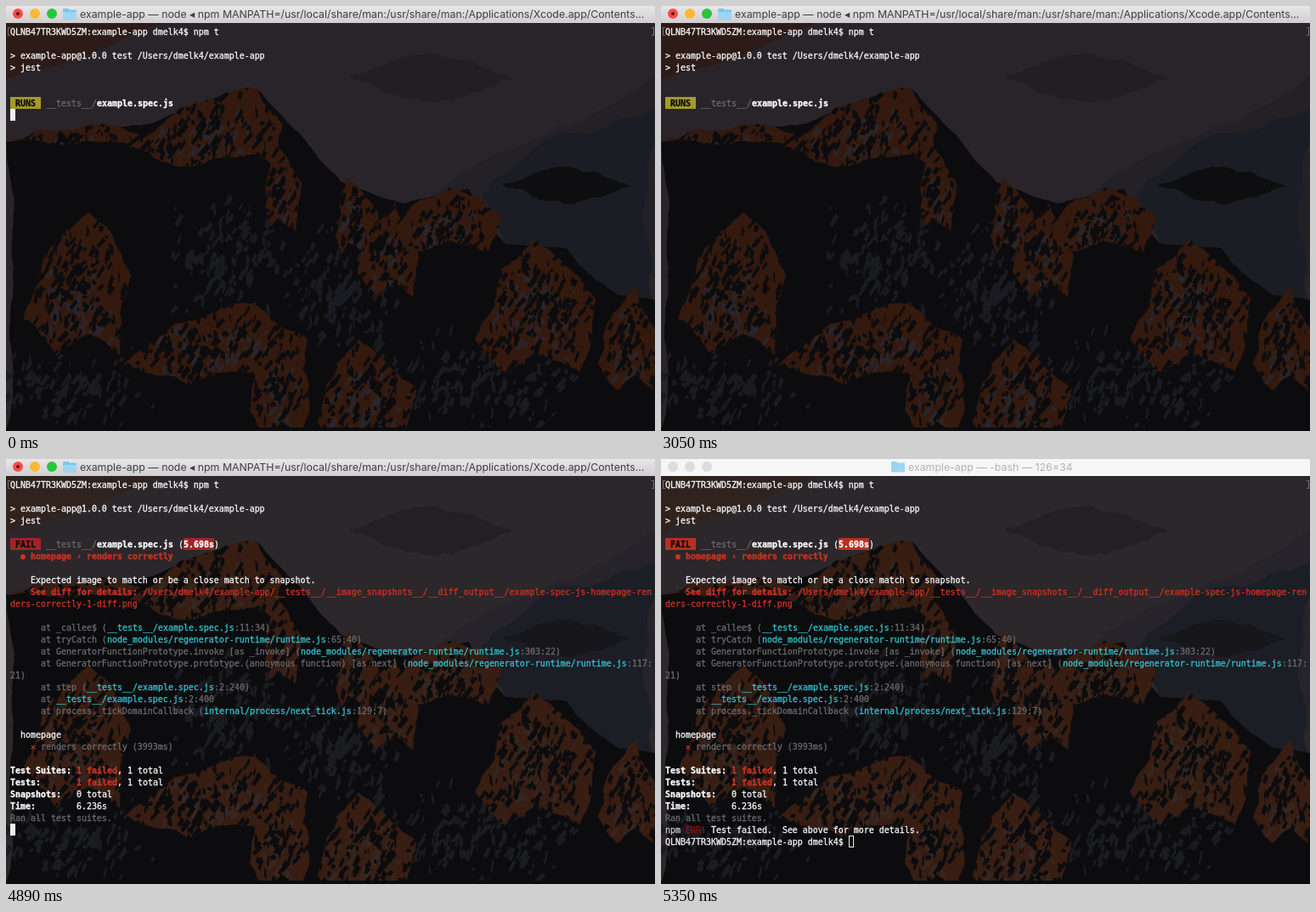
Write an HTML page with a canvas that moves like this. It is 764 px wide and 500 px high and loops after 5.45 s.

```html
<!DOCTYPE html>
<html lang="en">
<head>
<meta charset="utf-8">
<title>Terminal test run</title>
<style>
html, body { margin: 0; width: 100%; height: 100%; overflow: hidden; background: #0c0c0e; }
canvas { display: block; }
</style>
</head>
<body>
<canvas id="stage" width="764" height="500"></canvas>
<script>
const W = 764, H = 500, LOOP = 5450;
const CELL = 6, ROW = 14, LEFT = 5, TOP = 23, BAR = 20;
const MONO = '9.967px "DejaVu Sans Mono", monospace';
const TITLE_FONT = '12.35px Inter, sans-serif';
const ctx = document.getElementById('stage').getContext('2d');

const HOST = 'QLNB47TR3KWD5ZM', USER = 'dmelk4';
const PROMPT = `${HOST}:example-app ${USER}$ `;
const SPEC = '__tests__/example.spec.js';
const RUNTIME = 'node_modules/regenerator-runtime/runtime.js';

const STYLES = {
  white: { color: '#f8f8f8' },
  bold: { color: '#ffffff', bold: true },
  soft: { color: '#c7c7c7' },
  gray: { color: '#6b696b' },
  red: { color: '#c93522' },
  redBold: { color: '#c93522', bold: true },
  error: { color: '#940f10' },
  cyan: { color: '#34c2cd' },
  runs: { color: '#0c0c0c', bold: true, back: '#a59a2b' },
  fail: { color: '#0c0c0c', bold: true, back: '#a22428' },
  slow: { color: '#ffffff', bold: true, back: '#a22428' }
};

const trace = (call, file, place) =>
  [['gray', '      at ' + call], ['cyan', file], ['gray', place]];
const total = (label, rest, failed = '') =>
  [['bold', label.padEnd(13)], ['redBold', failed], ['white', rest]];

const command = {
  0: [['white', PROMPT + 'npm t']],
  2: [['white', `> example-app@1.0.0 test /Users/${USER}/example-app`]],
  3: [['white', '> jest']]
};
const running = {
  6: [['runs', ' RUNS '], ['gray', ' __tests__/'], ['bold', 'example.spec.js']]
};
const report = {
  5: [['fail', ' FAIL '], ['gray', ' __tests__/'], ['bold', 'example.spec.js'],
      ['white', ' ('], ['slow', '5.698s'], ['white', ')']],
  6: [['redBold', '  ●'], ['redBold', ' homepage ›'], ['redBold', ' renders correctly']],
  8: [['white', '    Expected image to match or be a close match to snapshot.']],
  9: [['redBold', '    See diff for details: '],
      ['red', `/Users/${USER}/example-app/__tests__/__image_snapshots__/__diff_output__/example-spec-js-homepage-ren`]],
  10: [['red', 'ders-correctly-1-diff.png']],
  12: trace('_callee$ (', SPEC, ':11:34)'),
  13: trace('tryCatch (', RUNTIME, ':65:40)'),
  14: trace('GeneratorFunctionPrototype.invoke [as _invoke] (', RUNTIME, ':303:22)'),
  15: trace('GeneratorFunctionPrototype.prototype.(anonymous function) [as next] (', RUNTIME, ':117:'),
  16: [['gray', '21)']],
  17: trace('step (', SPEC, ':2:240)'),
  18: trace('', SPEC, ':2:400'),
  19: trace('process._tickDomainCallback (', 'internal/process/next_tick.js', ':129:7)'),
  21: [['white', '  homepage']],
  22: [['red', '    ✕'], ['gray', ' renders correctly (3993ms)']],
  24: total('Test Suites:', ', 1 total', '1 failed'),
  25: total('Tests:', ', 1 total', '1 failed'),
  26: total('Snapshots:', '0 total'),
  27: total('Time:', '6.236s'),
  28: [['gray', 'Ran all test suites.']]
};
const finished = {
  29: [['soft', 'npm '], ['error', 'ERR!'], ['white', ' Test failed.  See above for more details.']],
  30: [['white', PROMPT]]
};

const runningScene = {
  sky: '#292429', glow: '#2c1b17', cloud: '#221e22', storm: '#0e0e11', haze: '#232026',
  blue: '#1b1d24', rock: '#0c0c0e', lit: '#34190e', snow: '#1a1b21', frost: '#2b2428'
};
const reportScene = {
  sky: '#2b272a', glow: '#30221d', cloud: '#231f22', storm: '#17171b', haze: '#26232a',
  blue: '#1c1e25', rock: '#0c0c0e', lit: '#371d12', snow: '#1b1c21', frost: '#362620'
};

function seeded(seed) {
  return () => (seed = (seed * 16807) % 2147483647) / 2147483647;
}

function paintBackdrop(colors) {
  const canvas = document.createElement('canvas');
  canvas.width = W;
  canvas.height = H;
  const g = canvas.getContext('2d'), random = seeded(71);
  const spread = () => random() + random() - 1;

  // Midpoint displacement turns a straight edge into a craggy one.
  function crag(path, x0, y0, x1, y1, rough) {
    const length = Math.hypot(x1 - x0, y1 - y0);
    if (length < 5) return path.lineTo(x1, y1);
    const x = (x0 + x1) / 2 + spread() * length * rough;
    const y = (y0 + y1) / 2 + spread() * length * rough;
    crag(path, x0, y0, x, y, rough);
    crag(path, x, y, x1, y1, rough);
  }

  function shape(tone, points, rough = .12) {
    const path = new Path2D();
    path.moveTo(...points[0]);
    points.forEach(([x, y], i) => crag(path, x, y, ...points[(i + 1) % points.length], rough));
    g.fillStyle = colors[tone];
    g.fill(path);
    return path;
  }

  function cloud(tone, cx, cy, rx, ry) {
    const ring = Array.from({ length: 12 }, (_, i) => {
      const angle = i * Math.PI / 6;
      return [cx + rx * Math.cos(angle), cy + ry * Math.sin(angle) ** 3];
    });
    shape(tone, ring, .15);
  }

  function shards(tone, cx, cy, rx, ry, count) {
    g.fillStyle = colors[tone];
    g.beginPath();
    for (let i = 0; i < count; i++) {
      const x = cx + spread() * rx, y = cy + spread() * ry;
      const wide = 1 + random() * 4, long = 4 + random() * 13, lean = long * (random() - .1) * .8;
      g.moveTo(x, y);
      g.lineTo(x + wide, y + long * .3);
      g.lineTo(x + wide - lean, y + long);
      g.lineTo(x - lean, y + long * .8);
    }
    g.fill();
  }

  // A sunlit slab below an apex, reaching out to both sides.
  function facet(x, y, left, right, height) {
    const path = shape('lit', [
      [x, y], [x + right, y + height * .45], [x + right * .75, y + height],
      [x, y + height * .85], [x - left * .5, y + height],
      [x - left, y + height * .75], [x - left * .6, y + height * .25]
    ]);
    const cx = x + (right - left) / 2, cy = y + height / 2;
    const area = (left + right) * height;
    g.save();
    g.clip(path);
    shards('frost', cx, cy + height * .1, (left + right) * .35, height * .4, area / 260);
    shards('rock', cx, cy, (left + right) * .6, height * .7, area / 95);
    g.restore();
  }

  g.fillStyle = colors.sky;
  g.fillRect(0, 0, W, H);
  shape('glow', [[0, BAR], [183, BAR], [95, 58], [0, 86]], .05);
  cloud('cloud', 500, 84, 97, 29);
  shape('haze', [[W, 82], [600, 166], [460, 240], [W, 320]]);
  shape('blue', [[W, 122], [632, 160], [560, 220], [590, 290], [W, 360]]);
  cloud('storm', 660, 211, 76, 22);

  shape('rock', [[0, 160], [160, 140], [295, 97], [395, 207], [470, 232], [545, 215],
    [588, 280], [660, 285], [720, 340], [W, 346], [W, H], [0, H]], .06);
  shards('snow', 262, 290, 75, 75, 130);
  shards('snow', 395, 330, 75, 85, 150);
  shards('snow', 70, 445, 110, 50, 120);
  shards('snow', 560, 440, 150, 75, 180);

  facet(100, 140, 100, 58, 22);
  facet(295, 97, 150, 30, 92);
  facet(318, 165, 12, 30, 100);
  facet(97, 243, 76, 50, 168);
  facet(290, 350, 152, 65, 95);
  facet(325, 378, 38, 30, 130);
  facet(415, 392, 48, 68, 130);
  facet(402, 202, 14, 36, 90);
  facet(458, 232, 44, 28, 110);
  facet(522, 214, 70, 62, 75);
  facet(622, 273, 70, 72, 158);
  facet(742, 330, 45, 26, 122);
  g.fillStyle = colors.rock;
  g.fillRect(0, 496, W, 4);
  return canvas;
}

function drawRows(rows, focused) {
  ctx.lineWidth = .3;
  for (const [row, runs] of Object.entries(rows)) {
    const y = TOP + row * ROW;
    let x = LEFT;
    for (const [name, text] of runs) {
      const style = STYLES[name], width = text.length * CELL;
      if (style.back) {
        ctx.fillStyle = focused ? style.back : '#b73022';
        ctx.fillRect(x, y, width, ROW);
      }
      ctx.font = (style.bold ? 'bold ' : '') + MONO;
      ctx.fillStyle = ctx.strokeStyle = style.color;
      ctx.fillText(text, x, y + 11);
      ctx.strokeText(text, x, y + 11);
      x += width;
    }
  }
  ctx.lineWidth = 1;
}

function drawCursor(column, row, focused) {
  const x = LEFT + column * CELL, y = TOP + row * ROW;
  if (focused) {
    ctx.fillStyle = '#eeeeee';
    ctx.fillRect(x, y, CELL, ROW);
  } else {
    ctx.strokeStyle = '#eeeeee';
    ctx.strokeRect(x + .5, y + .5, CELL - 1, ROW - 1);
  }
}

function drawFolder(x, focused) {
  ctx.globalAlpha = focused ? 1 : .75;
  ctx.fillStyle = '#7cc6ea';
  ctx.beginPath();
  ctx.roundRect(x, 3, 7, 5, 1);
  ctx.roundRect(x, 4.5, 16, 11, 1);
  ctx.fill();
  ctx.fillStyle = '#9bd7f4';
  ctx.fillRect(x, 7, 16, 8);
  ctx.globalAlpha = 1;
}

function disc(x, y, radius, color) {
  ctx.fillStyle = color;
  ctx.beginPath();
  ctx.arc(x, y, radius, 0, Math.PI * 2);
  ctx.fill();
}

function drawTitleBar(title, x, focused) {
  const shade = ctx.createLinearGradient(0, 0, 0, BAR);
  shade.addColorStop(0, focused ? '#e8e6e8' : '#f6f6f6');
  shade.addColorStop(1, focused ? '#d0ced0' : '#f6f6f6');
  ctx.fillStyle = shade;
  ctx.fillRect(0, 0, W, BAR);
  ['#fc4b48', '#fdb92f', '#29c53c'].forEach((color, i) =>
    disc(14 + i * 20, 9, 6, focused ? color : '#dcdcdc'));
  if (focused) disc(14, 9, 2, '#5a0c0b');
  drawFolder(x - 20, focused);
  ctx.font = TITLE_FONT;
  ctx.fillStyle = focused ? '#403e40' : '#b2b2b2';
  ctx.fillText(title, x, 14);
}

function drawBrackets() {
  ctx.strokeStyle = '#777477';
  ctx.beginPath();
  for (const [x, tip] of [[2.5, 5], [762.5, 760]]) {
    ctx.moveTo(tip, 25.5);
    ctx.lineTo(x, 25.5);
    ctx.lineTo(x, 34.5);
    ctx.lineTo(tip, 34.5);
  }
  ctx.stroke();
}

const REPORT_AT = 4890, EXIT_AT = 4950, SHELL_AT = 5030, BLUR_AT = 5350;
const BLINKS = [30, 570, 2060, 2330, 3050, 3520, 4060, 4540];
const runningBackdrop = paintBackdrop(runningScene);
const reportBackdrop = paintBackdrop(reportScene);

function draw(time) {
  const focused = time < BLUR_AT, reported = time >= REPORT_AT;
  ctx.drawImage(reported ? reportBackdrop : runningBackdrop, 0, 0);
  if (time < SHELL_AT) {
    drawTitleBar('example-app — node ◂ npm MANPATH=/usr/local/share/man:/usr/share/man:/Applications/Xcode.app/Contents...', 87, true);
  } else {
    drawTitleBar('example-app — -bash — 126×34', 291, focused);
  }
  drawBrackets();
  drawRows(command, focused);
  drawRows(reported ? report : running, focused);
  if (time >= EXIT_AT) {
    drawRows(finished, focused);
    drawCursor(PROMPT.length, 30, focused);
  } else if (reported) {
    drawCursor(0, 29, true);
  } else if (BLINKS.filter(at => at <= time).length % 2 === 0) {
    drawCursor(0, 7, true);
  }
}

const start = performance.now();
function tick() {
  draw((performance.now() - start) % LOOP);
  requestAnimationFrame(tick);
}
tick();
</script>
</body>
</html>
```
